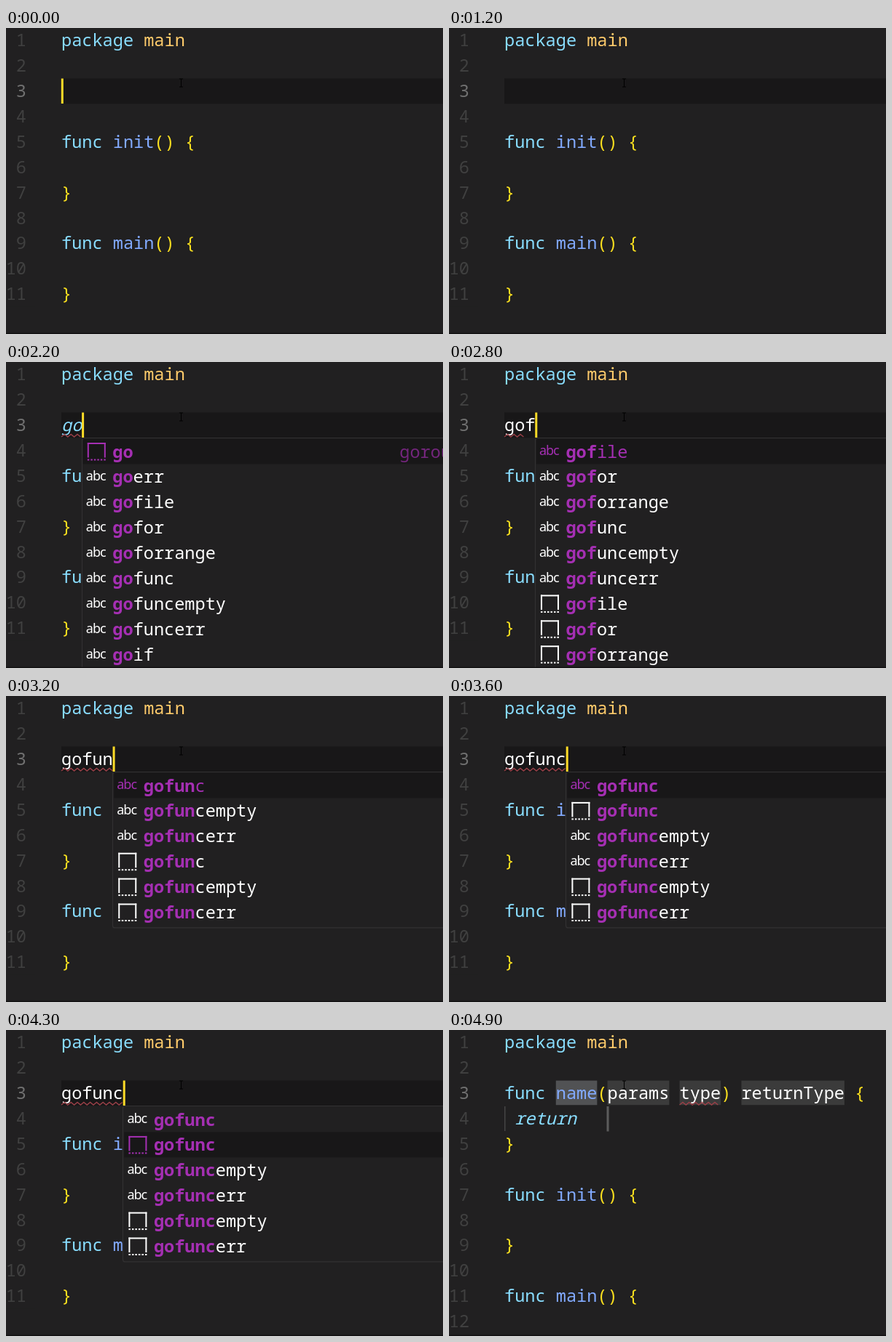
These frames come from a looping animation (600 by 421 pixels, 5000 ms). An HTML page with a canvas:

```html
<!DOCTYPE html>
<html lang="en">
<head>
<meta charset="utf-8">
<title>Go snippet completion</title>
<style>
  html, body { margin: 0; width: 100%; height: 100%; overflow: hidden; background: #212021; }
  canvas { display: block; }
</style>
</head>
<body>
<canvas id="stage" width="600" height="421"></canvas>
<script>
const ctx = document.getElementById('stage').getContext('2d');
const LOOP = 5000, BLINK = 500;
const LEFT = 76, CHAR = 14.15, LINE = 34.9;
const MONO = '23.6px "Noto Sans Mono", monospace';
const C = {
  bg: '#212021', active: '#181718', border: '#323132', number: '#404040', activeNumber: '#707070',
  keyword: '#89ddff', pkg: '#ffcb6b', name: '#82aaff', bracket: '#fbe01f', text: '#ffffff',
  match: '#a52fb3', detail: '#74267d', error: '#9a4048', cursor: '#fddb27',
  field: '#3b3b3b', selected: '#515254'
};

// Code lines are lists of [column, text, colour, style].
const fn = name => [[0, 'func', C.keyword], [5, name, C.name], [9, '()', C.bracket], [12, '{', C.bracket]];
const close = [[0, '}', C.bracket]];
const head = [[[0, 'package', C.keyword], [8, 'main', C.pkg]], []];
const tail = [[], fn('init'), [], close, [], fn('main'), [], close];
const snippet = [
  [[0, 'func', C.keyword], [5, 'name', C.name], [9, '(', C.bracket], [10, 'params type', C.text],
   [21, ')', C.bracket], [23, 'returnType', C.text], [34, '{', C.bracket]],
  [[1, 'return', C.keyword, 'italic']],
  close
];

// A leading '#' marks a snippet icon instead of "abc".
const list = words => words.split(' ');
const goList = list('#go goerr gofile gofor goforrange gofunc gofuncempty gofuncerr goif');
const gofList = list('gofile gofor goforrange gofunc gofuncempty gofuncerr #gofile #gofor #goforrange');
const gofuList = list('gofunc gofuncempty gofuncerr #gofunc #gofuncempty #gofuncerr');
const gofuncList = list('gofunc #gofunc gofuncempty gofuncerr #gofuncempty #gofuncerr');

// typed: when the caret blink restarted; wavy: underlined characters
const states = [
  { at: 0, typed: -300, text: '', wavy: 0 },
  { at: 1600, typed: 1600, text: 'g', wavy: 0 },
  { at: 1700, typed: 1600, text: 'g', wavy: 1, items: goList, pick: 0 },
  { at: 1900, typed: 1900, text: 'go', wavy: 2, items: goList, pick: 0 },
  { at: 2700, typed: 2700, text: 'gof', wavy: 2, items: gofList, pick: 0 },
  { at: 2900, typed: 2900, text: 'gofu', wavy: 4, items: gofuList, pick: 0 },
  { at: 3100, typed: 3100, text: 'gofun', wavy: 5, items: gofuList, pick: 0 },
  { at: 3300, typed: 3300, text: 'gofunc', wavy: 6, items: gofuncList, pick: 0 },
  { at: 3900, typed: 3300, text: 'gofunc', wavy: 6, items: gofuncList, pick: 1 },
  { at: 4400, typed: 4400, done: true }
];

const colX = col => LEFT + col * CHAR;
const rowY = row => (row - 1) * LINE - 0.4;

function rect(x, y, w, h, color) {
  ctx.fillStyle = color;
  ctx.fillRect(x, y, w, h);
}

function write(text, x, baseline, color, style = '') {
  ctx.font = `${style} ${MONO}`;
  ctx.fillStyle = color;
  [...text].forEach((ch, i) => ctx.fillText(ch, x + i * CHAR, baseline));
}

function drawLines(lines) {
  lines.forEach((line, i) => {
    for (const [col, text, color, style] of line) write(text, colX(col), rowY(i + 1) + 25.6, color, style);
  });
}

function drawNumbers() {
  const count = 12;
  for (let n = 1; n <= count; n++) {
    const label = String(n);
    write(label, 28 - label.length * CHAR, rowY(n) + 25.6, n === 3 ? C.activeNumber : C.number);
  }
}

function drawWave(col, length) {
  const start = colX(col), end = colX(col + length);
  ctx.beginPath();
  for (let x = start, up = false; x <= end; x += 4.4, up = !up) ctx.lineTo(x, up ? 99.5 : 103);
  ctx.strokeStyle = C.error;
  ctx.lineWidth = 1.4;
  ctx.stroke();
}

function drawIcon(isSnippet, x, y, color) {
  if (!isSnippet) {
    ctx.font = '18px "Noto Sans", sans-serif';
    ctx.letterSpacing = '-1px';
    ctx.fillStyle = color;
    ctx.fillText('abc', x + 5.5, y + 22.8);
    ctx.letterSpacing = '0px';
    return;
  }
  rect(x + 7.5, y + 5.5, 25, 2, color);
  rect(x + 7.5, y + 5.5, 2, 20.5, color);
  rect(x + 30.5, y + 5.5, 2, 20.5, color);
  for (let i = 0; i < 6; i++) rect(x + 7.5 + i * 4.5, y + 28, 2.5, 2, color);
}

function drawPopup({ text, items, pick }) {
  const x = colX(text.length), top = 104.5;
  ctx.beginPath();
  ctx.roundRect(Math.floor(x) + 0.5, top, 700, items.length * LINE + 5, 3);
  ctx.fillStyle = C.bg;
  ctx.fill();
  ctx.strokeStyle = C.border;
  ctx.lineWidth = 1.2;
  ctx.stroke();
  items.forEach((item, i) => {
    const y = top + 1 + i * LINE, picked = i === pick;
    const label = item.replace('#', ''), n = text.length;
    const color = picked ? C.match : C.text;
    if (picked) rect(x + 1.5, y, 600, LINE, C.active);
    drawIcon(item !== label, x, y, color);
    write(label.slice(0, n), x + 42, y + 26, C.match, 'bold');
    write(label.slice(n), x + 42 + n * CHAR, y + 26, color);
    if (label === 'go') write('goroutine', x + 436, y + 26, C.detail);
  });
}

function drawTyping(state) {
  const { text } = state;
  const keyword = text === 'go';
  rect(LEFT, 69.4, 524, LINE, C.active);
  drawLines([...head, [[0, text, keyword ? C.keyword : C.text, keyword ? 'italic' : '']], ...tail]);
  drawWave(0, state.wavy);
  if (state.items) drawPopup(state);
}

function drawSnippet(t) {
  const box = (col, length, color) => rect(colX(col), 69.6, length * CHAR, 33.6, color);
  box(5, 4, C.selected);
  box(10, 6, C.field);
  box(17, 4, C.field);
  box(23, 10, C.field);
  rect(LEFT, 105, 1.5, 34, '#454545');
  rect(colX(10) - 1, 105, 3, 34.5, '#5c5c5c');
  drawLines([...head, ...snippet, ...tail]);
  if (t >= 4600) drawWave(17, 4);
}

function drawPointer() {
  rect(240, 70, 1, 11, '#000');
  rect(238, 69.5, 5, 1, '#000');
  rect(238, 80.5, 5, 1, '#000');
}

function draw(t) {
  const state = states.findLast(s => t >= s.at);
  rect(0, 0, 600, 421, C.bg);
  drawNumbers();
  if (!state.done) rect(0, rowY(12), 40, LINE, C.bg);
  if (state.done) drawSnippet(t);
  else drawTyping(state);
  if (Math.floor((t - state.typed) / BLINK) % 2 === 0) {
    rect(colX(state.done ? 9 : state.text.length) - 0.2, 69.5, 3, 34.5, C.cursor);
  }
  drawPointer();
  rect(0, 419.6, 600, 1.4, '#111');
}

const start = performance.now();
function tick() {
  draw((performance.now() - start) % LOOP);
  requestAnimationFrame(tick);
}
tick();
</script>
</body>
</html>
```
